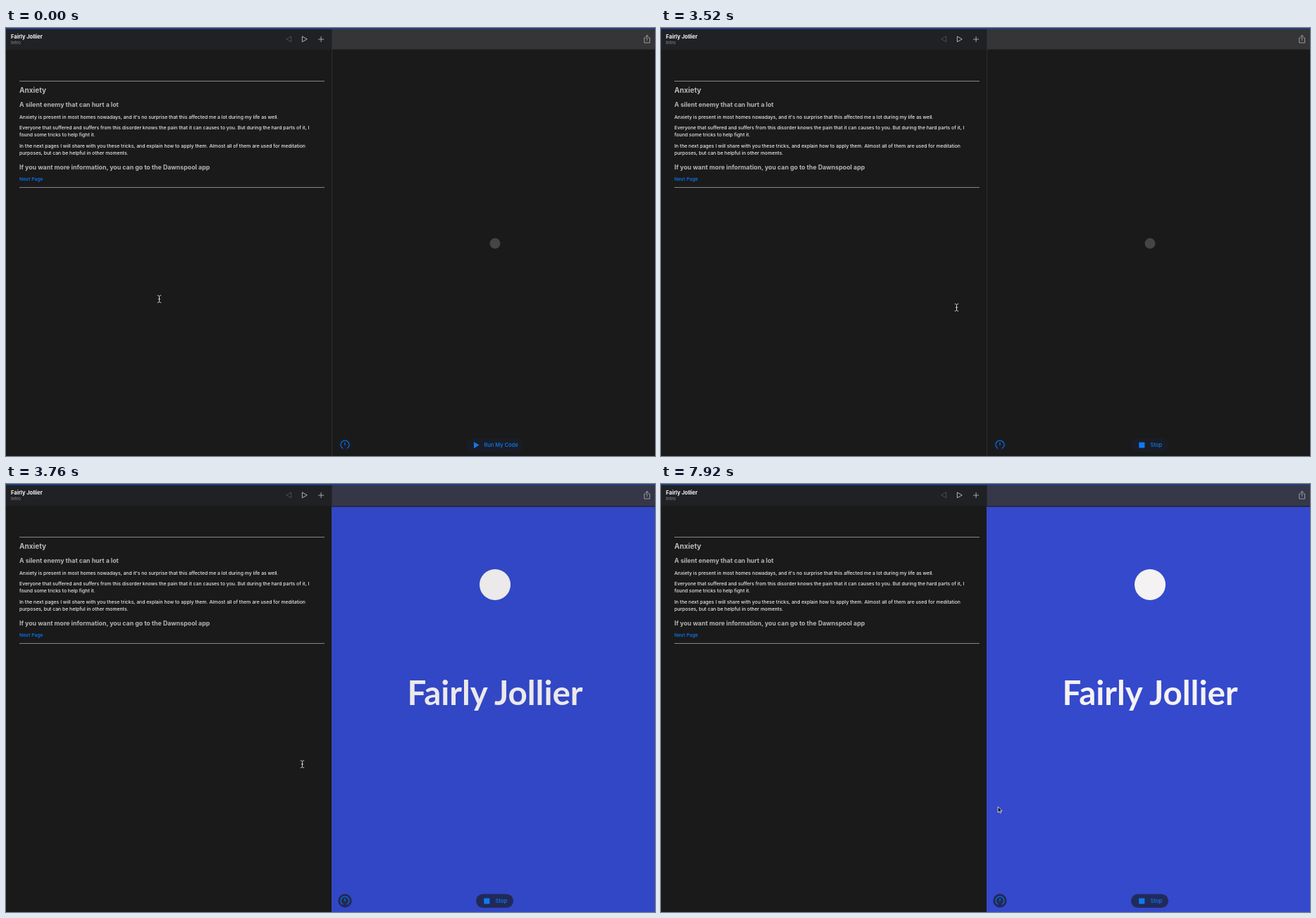
Recreate the animation shown at these times as an HTML page. Size 921 by 608 pixels, loop 8 s.

```html
<!DOCTYPE html>
<html lang="en">
<head>
<meta charset="utf-8">
<title>Playground</title>
<style>
  html, body { margin: 0; width: 100%; height: 100%; overflow: hidden; background: #1a1a1a; }
  svg { display: block; width: 100%; height: 100%; }
  text { font-family: Inter, "Noto Sans", sans-serif; font-size: 6.85px; font-weight: 500; fill: #ebebeb; white-space: pre; }
  .bold { font-weight: 700; }
  .title { font-size: 7.5px; fill: #f4f4f5; }
  .sub { font-size: 6.5px; font-weight: 400; fill: #8d8e92; }
  .h1 { font-size: 10px; fill: #b9b9b9; }
  .h2 { font-size: 8.8px; fill: #b4b4b4; }
  .link { fill: #0a7aff; }
  .button { font-size: 7.5px; fill: #0f79f2; }
  .brand { font-family: Lato, "Open Sans", sans-serif; font-size: 47.5px; font-weight: 700; fill: #f4f2f2; text-anchor: middle; }
  .line { fill: none; stroke-linecap: round; stroke-linejoin: round; }
  .pill { fill: rgba(26, 30, 42, .7); }
  .blue { fill: #0f79f2; }
  .ring { stroke: #0f79f2; stroke-width: 1.1; }
</style>
</head>
<body>
<svg viewBox="0 0 921 608">
  <defs>
    <path id="beamShape" d="M-2.4-5.2Q0-5.2 0-3.4Q0-5.2 2.4-5.2M0-3.4V3.4M-2.4 5.2Q0 5.2 0 3.4Q0 5.2 2.4 5.2M-1.3 0H1.3"/>
  </defs>

  <rect width="921" height="608" fill="#1a1a1a"/>
  <rect width="463" height="31" fill="#202125"/>
  <rect x="463" width="458" height="30.5" fill="#353537"/>
  <path d="M462.5 2V608" stroke="#2b2b2e"/>
  <circle cx="694" cy="306" r="7.5" fill="#454545"/>

  <g id="splash" opacity="0">
    <rect x="463" width="458" height="31" fill="#363849"/>
    <rect x="462" y="32" width="459" height="576" fill="#3449cc"/>
    <rect x="463" y="31" width="458" height="1.5" fill="#20222f"/>
    <circle cx="694" cy="143" r="22" fill="#f4f2f2"/>
    <text class="brand" x="694" y="314">Fairly Jollier</text>
  </g>

  <rect width="921" height="1.7" fill="#1f4287"/>

  <text class="title bold" x="7" y="15.3">Fairly Jollier</text>
  <text class="sub" x="7" y="23.3">Intro</text>
  <g class="line" stroke="#b4b4b7">
    <path d="M404.7 12.3v7.4l-6.5-3.7z" stroke="#4c4d51"/>
    <path d="M420.4 12.3v7.4l6.5-3.7z"/>
    <path d="M443.5 16h7.2M447.1 12.4v7.2" stroke-width=".9"/>
    <path d="M907.5 14h-1.7v7h7.8v-7h-1.7M909.7 17.5v-7M907.7 12.3l2-2 2 2" stroke="#a5a5a9" stroke-width=".9"/>
  </g>

  <path d="M19 75.5H452M19 226.5H452" stroke="#858585"/>
  <text class="h1 bold" x="19" y="92">Anxiety</text>
  <text class="h2 bold" x="19" y="112">A silent enemy that can hurt a lot</text>
  <text x="19" y="128.5">Anxiety is present in most homes nowadays, and it's no surprise that this affected me a lot during my life as well.</text>
  <text x="19" y="144">Everyone that suffered and suffers from this disorder knows the pain that it can causes to you. But during the hard parts of it, I</text>
  <text x="19" y="154.4">found some tricks to help fight it.</text>
  <text x="19" y="170">In the next pages I will share with you these tricks, and explain how to apply them. Almost all of them are used for meditation</text>
  <text x="19" y="180.4">purposes, but can be helpful in other moments.</text>
  <text class="h2 bold" x="19" y="201">If you want more information, you can go to the Dawnspool app</text>
  <text class="link" x="19" y="217.3">Next Page</text>

  <circle class="pill" cx="481" cy="592" r="9.7"/>
  <path id="gauge" class="line ring" d="M477.7 597a6 6 0 1 1 6.6 0M481 589v3.4"/>

  <g id="run">
    <rect class="pill" x="653" y="582.5" width="81.5" height="19.5" rx="9.75"/>
    <path class="blue" d="M664 588v9l7.5-4.5z"/>
    <text class="button" x="678.4" y="595.2">Run My Code</text>
  </g>
  <g id="spin">
    <circle class="pill" cx="694" cy="592" r="9.7"/>
    <path id="arc" class="line ring" d="M688.6 589.4a6 6 0 0 1 10.8 0" opacity=".6"/>
  </g>
  <g id="stop">
    <rect class="pill" x="667" y="582.5" width="53" height="19.5" rx="9.75"/>
    <rect class="blue" x="678.2" y="588.4" width="8.2" height="8.2" rx=".8"/>
    <text class="button" x="694.6" y="595.2">Stop</text>
  </g>

  <g id="beam" class="line">
    <use href="#beamShape" stroke="#0b0b0b" stroke-width="2"/>
    <use href="#beamShape" stroke="#d8d8d8"/>
  </g>
  <path id="arrow" d="M-1.8-4.2V4.2L.2 2.5 1.4 5.2 2.7 4.6 1.5 2H4z" fill="#080808" stroke="#f2f2f2" stroke-width=".8"/>
</svg>
<script>
const LOOP = 8000, STEP = 80;
const SPIN_AT = 1920, SPIN_END = 3120, STOP_AT = 3440;
const el = id => document.getElementById(id);
const show = (id, on) => { el(id).style.display = on ? "" : "none"; };

// [time, x, y]
const pointer = [
  [0, 217.5, 385], [160, 217.5, 385], [880, 700, 592], [1920, 700, 592],
  [2480, 424, 399.5], [2720, 424, 399.5], [3120, 419.5, 397], [3600, 419.5, 397],
  [3760, 420.5, 398], [4960, 425, 393], [6000, 414.5, 391.5], [7200, 414.5, 391.5],
  [7760, 442, 385], [7840, 457, 418], [7920, 480, 462.5]
];
// [time, opacity]
const fade = [[0, 0], [3520, 0], [3600, .13], [3680, .55], [3760, .96], [3840, 1]];

function sample(keys, t) {
  const i = keys.findIndex(k => k[0] > t);
  if (i < 0) return keys[keys.length - 1].slice(1);
  const a = keys[i - 1], b = keys[i];
  const p = (t - a[0]) / (b[0] - a[0]);
  const e = p * p * (3 - 2 * p);
  return a.slice(1).map((v, j) => v + (b[j + 1] - v) * e);
}

function draw(now) {
  const t = Math.floor(now % LOOP / STEP) * STEP;
  const spinning = t >= SPIN_AT && t < STOP_AT;
  show("run", t < SPIN_AT);
  show("spin", spinning);
  show("stop", t >= STOP_AT);
  el("gauge").setAttribute("opacity", spinning ? .6 : 1);
  const angle = (Math.min(t, SPIN_END) - 2560) * .36;
  el("arc").setAttribute("transform", `rotate(${angle} 694 592)`);
  el("splash").setAttribute("opacity", sample(fade, t)[0]);

  const [x, y] = sample(pointer, t);
  const overPanel = x > 463;
  show("beam", !overPanel);
  show("arrow", overPanel);
  el(overPanel ? "arrow" : "beam").setAttribute("transform", `translate(${x} ${y})`);
}

const start = performance.now();
function tick() {
  draw(performance.now() - start);
  requestAnimationFrame(tick);
}
tick();
</script>
</body>
</html>
```
